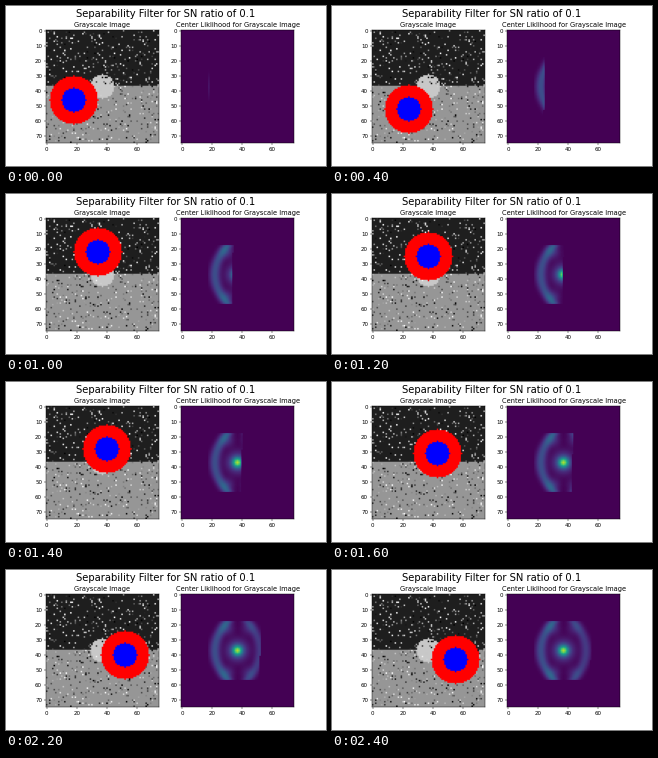
Write a matplotlib script that moves like this. It is 320 px wide and 160 px high and loops after 2500 ms.

```python
import numpy as np
import matplotlib.pyplot as plt
from matplotlib.animation import FuncAnimation

plt.rcParams["font.family"] = "DejaVu Sans"

SIZE, MARGIN = 75, 18
SPAN = SIZE - 2 * MARGIN
MID = SIZE // 2
INNER, OUTER = 8, 16
FIRST, STEP, FRAMES = 28, 60, 25

yy, xx = np.mgrid[:SIZE, :SIZE]


def dist(cx, cy):
    return np.hypot(xx - cx, yy - cy)


def make_scene():
    """Two-tone background with a bright disc and 10% noise."""
    rng = np.random.default_rng(4)
    gray = np.where(yy < MID, 30, 150)
    gray[dist(MID, MID) <= INNER] = 200
    noisy = rng.random(gray.shape) < 0.1
    gray[noisy] = rng.integers(0, 256, noisy.sum())
    return np.repeat(gray[..., None], 3, axis=2).astype(np.uint8)


def make_likelihood():
    """Central peak flanked by two arcs that bend inwards."""
    dx, dy = xx - MID, yy - MID
    r2 = dx**2 + dy**2
    peak = 0.58 * np.exp(-r2 / 3.0**2) + 0.3 * np.exp(-r2 / 6.5**2)
    bend = 15 - 8 * (dy / 19) ** 2
    arc = 0.24 * np.exp(-(((np.abs(dx) - bend) / 3.4) ** 2))
    lobe = 0.13 * np.exp(-((np.abs(dx) - 7) ** 2 + (np.abs(dy) - 15) ** 2) / 4.5**2)
    side = np.where(dx > 0, 0.7, 1.0)
    return peak + side * (arc + lobe)


scene = make_scene()
likelihood = make_likelihood()
inside = (np.abs(xx - MID) <= SPAN // 2) & (np.abs(yy - MID) <= SPAN // 2)
order = (xx - MARGIN) * SPAN + (yy - MARGIN)

fig, (left, right) = plt.subplots(1, 2, figsize=(8, 4), dpi=40)
fig.suptitle("Separability Filter for SN ratio of 0.1", fontsize=18)
left.set_title("Grayscale Image", fontsize=12)
right.set_title("Center Liklihood for Grayscale Image", fontsize=12)
view = left.imshow(scene)
heat = right.imshow(np.zeros((SIZE, SIZE)), cmap="viridis", vmin=0, vmax=1)
for ax in (left, right):
    ax.set_xticks(range(0, SIZE, 20))
    ax.set_yticks(range(0, SIZE, 10))


def update(i):
    pos = FIRST + STEP * i
    col, row = divmod(pos, SPAN)
    d = dist(MARGIN + col, MARGIN + row)
    img = scene.copy()
    img[d <= OUTER] = (255, 0, 0)
    img[d <= INNER] = (0, 0, 255)
    view.set_data(img)
    heat.set_data(np.where(inside & (order <= pos), likelihood, 0))
    return view, heat


anim = FuncAnimation(fig, update, frames=FRAMES, interval=100,
                     repeat=True, repeat_delay=0)
plt.show()
```
